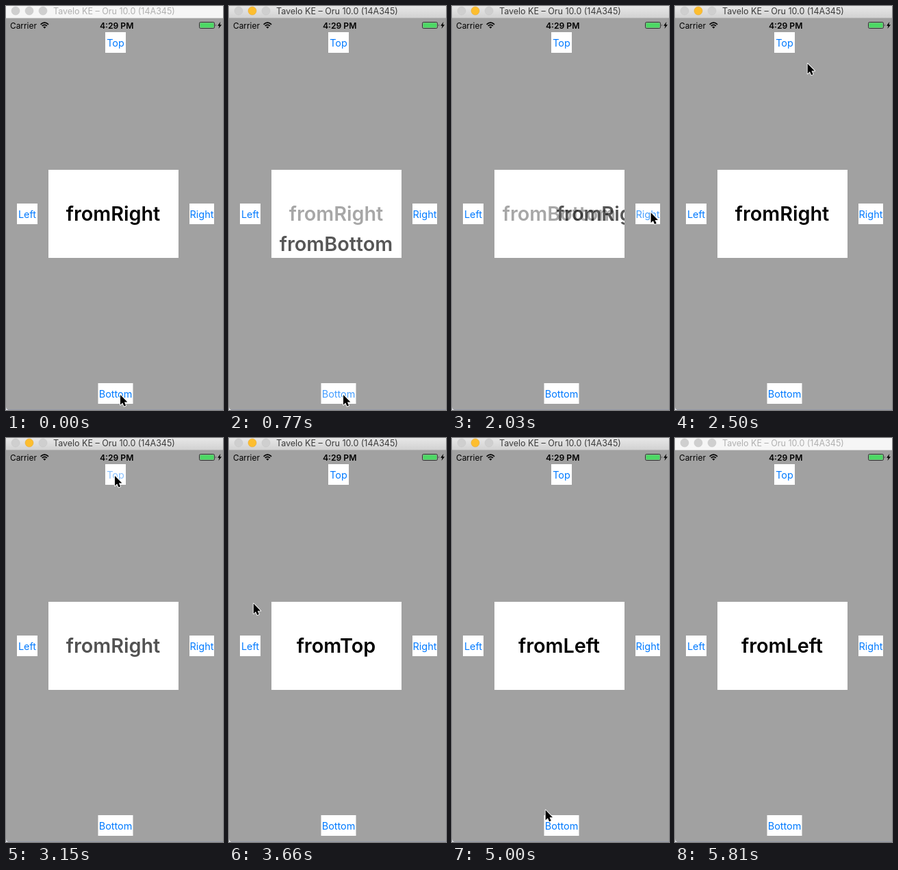
Recreate the animation shown at these times as an HTML page. Size 317 by 587 pixels, loop 5830 ms.

```html
<!DOCTYPE html>
<html lang="en">
<head>
<meta charset="utf-8">
<title>Label transitions</title>
<style>
html, body { margin: 0; width: 100%; height: 100%; overflow: hidden; background: #a1a1a1; }
svg { display: block; width: 317px; height: 587px; font-family: Inter, sans-serif; }
.btn { font-size: 14.4px; fill: #007aff; text-anchor: middle; }
.label { font-size: 28.8px; font-weight: 600; text-anchor: middle; }
</style>
</head>
<body>
<svg viewBox="0 0 317 587">
  <defs>
    <linearGradient id="bar" x2="0" y2="1">
      <stop stop-color="#e7e7e7"/><stop offset="1" stop-color="#d2d2d2"/>
    </linearGradient>
    <clipPath id="box"><rect x="62" y="238" width="190" height="128"/></clipPath>
  </defs>
  <rect width="317" height="587" fill="#a1a1a1"/>

  <rect id="titleBar" width="317" height="17"/>
  <rect id="barLine" y="17" width="317" height="1"/>
  <g stroke-width=".5">
    <circle class="dot" cx="14" cy="7" r="6"/>
    <circle class="dot" cx="34" cy="7" r="6"/>
    <circle class="dot" cx="54" cy="7" r="6"/>
  </g>
  <text id="title" x="69" y="12" font-size="12.5">Tavelo KE – Oru 10.0 (14A345)</text>

  <text x="6" y="32.5" font-size="11.9">Carrier</text>
  <path d="M50.6 26.8Q56.3 21.4 62 26.8M52.7 29Q56.3 25.6 59.9 29" fill="none" stroke="#000" stroke-width="1.7"/>
  <path d="M54.2 30.6Q56.3 28.9 58.4 30.6L56.3 32.8Z"/>
  <text x="161.7" y="32.5" font-size="12.2" font-weight="600" text-anchor="middle">4:29 PM</text>
  <rect x="282.5" y="23.5" width="22" height="9" rx="1.8" fill="none" stroke="#333"/>
  <rect x="283.5" y="24.5" width="20" height="7" rx=".8" fill="#4cd964"/>
  <path d="M306 26.2Q307.6 28 306 29.8Z" fill="#222"/>
  <path d="M313.4 23L309 28.7H311.6L310.4 33L315 27.2H312.3Z"/>

  <g id="buttons"></g>
  <rect x="62" y="238" width="190" height="128" fill="#fff"/>
  <g clip-path="url(#box)">
    <text id="oldLabel" class="label"></text>
    <text id="newLabel" class="label"></text>
  </g>

  <path d="M0 582Q0 587 5 587H0Z" fill="#e4e6ee"/>
  <path d="M3 586.5H317" stroke="#9599a8"/>
  <path id="cursor" d="M0 0V14.6L3.3 11.6L5.5 16.6L8.1 15.5L5.9 10.6H10.4Z"
    stroke="#fff" stroke-width="1.8" stroke-linejoin="round" paint-order="stroke"/>
</svg>
<script>
const LOOP = 5830, START = 600, END = 5810, STEP = 57.8;
const SLIDE = 258, DELAY = 17;
const BOX = { w: 190, h: 128 };
const $ = id => document.getElementById(id);

// button place and the direction its label enters from
const sides = {
  Top: { x: 145, y: 38, w: 30, dx: 0, dy: -1 },
  Left: { x: 16, y: 287, w: 30, dx: -1, dy: 0 },
  Right: { x: 268, y: 287, w: 36, dx: 1, dy: 0 },
  Bottom: { x: 134.5, y: 548, w: 51, dx: 0, dy: 1 }
};

// taps, counted in refresh steps after START
const taps = [
  { step: 0, name: "Bottom" }, { step: 22, name: "Right" },
  { step: 42, name: "Top" }, { step: 61, name: "Left" }
];

// pointer moves: each bends through a control point to its end
const home = [167, 565];
const moves = [
  { from: 890, to: 1570, bend: [270, 465], end: [290, 304] },
  { from: 2000, to: 2650, bend: [310, 170], end: [159, 55] },
  { from: 3140, to: 3850, bend: [42, 130], end: [28, 294] },
  { from: 4370, to: 4800, bend: [-25, 420], end: [39, 480] },
  { from: 4900, to: 5060, bend: [90, 545], end: [231, 558] },
  { from: 5190, to: 5340, bend: [245, 572], end: [256, 590] }
];

for (const [name, { x, y, w }] of Object.entries(sides)) {
  $("buttons").innerHTML += `<rect x="${x}" y="${y}" width="${w}" height="30" fill="#fff"/>
    <text class="btn" id="${name}" x="${x + w / 2}" y="${y + 20.6}">${name}</text>`;
}

function set(el, attrs) {
  for (const key in attrs) el.setAttribute(key, attrs[key]);
}

function ease(x) {
  const u = Math.min(1, Math.max(0, x));
  return u * u * (3 - 2 * u);
}

function pointer(t) {
  let pos = home;
  for (const { from, to, bend, end } of moves) {
    if (t < from) break;
    const u = ease((t - from) / (to - from)), v = 1 - u;
    pos = pos.map((p, i) => v * v * p + 2 * u * v * bend[i] + u * u * end[i]);
  }
  return pos;
}

function drawWindow(active) {
  set($("titleBar"), { fill: active ? "url(#bar)" : "#f6f6f6" });
  set($("barLine"), { fill: active ? "#b4b4b4" : "#d4d4d4" });
  set($("title"), { fill: active ? "#3a3a3a" : "#b0b0b0" });
  document.querySelectorAll(".dot").forEach((dot, i) => {
    const lit = active && i === 1;
    set(dot, { fill: lit ? "#fdbe2f" : "#cfcfcf", stroke: lit ? "#e0a02a" : "#c2c2c2" });
  });
}

function drawLabel(id, name, dx, dy, opacity) {
  $(id).textContent = "from" + name;
  set($(id), { x: 156.5 + dx, y: 312.3 + dy, opacity });
}

function draw(now) {
  drawWindow(now >= START && now < END);

  // the screen refreshes in fixed steps
  const step = Math.floor((now - START) / STEP + .25);
  const t = START + step * STEP;
  const n = now < START ? -1 : taps.filter(tap => tap.step <= step).length - 1;
  const name = n < 0 ? "Right" : taps[n].name;
  const prev = n > 0 ? taps[n - 1].name : "Right";
  const p = n < 0 ? 1 : ease(((step - taps[n].step) * STEP - DELAY) / SLIDE);

  const { dx, dy } = sides[name];
  drawLabel("oldLabel", prev, 0, 0, 1 - p);
  drawLabel("newLabel", name, dx * BOX.w * (1 - p), dy * BOX.h * (1 - p), p);
  for (const key in sides) set($(key), { opacity: key === name ? .2 + .8 * p : 1 });

  set($("cursor"), { transform: `translate(${pointer(t)})` });
}

const begin = performance.now();
function tick() {
  draw((performance.now() - begin) % LOOP);
  requestAnimationFrame(tick);
}
tick();
</script>
</body>
</html>
```
